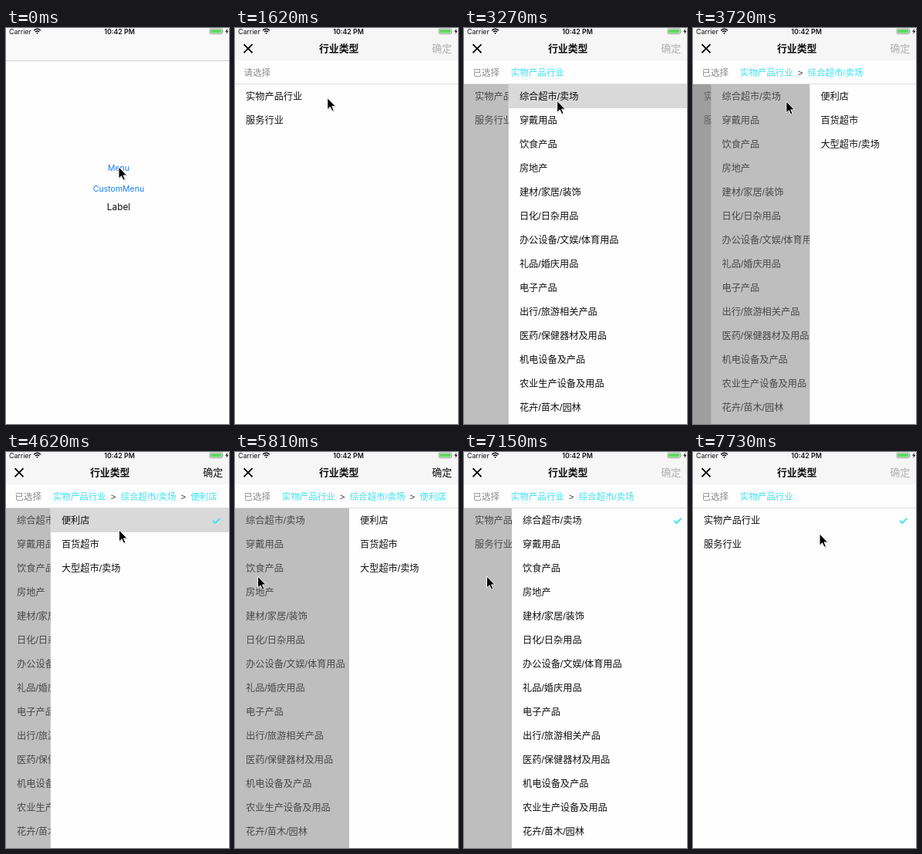
An HTML page for the animation above (8 s loop, 289 by 513 pixels).

```html
<!DOCTYPE html>
<html lang="zh-CN">
<head>
<meta charset="utf-8">
<style>
html, body { margin: 0; width: 100%; height: 100%; overflow: hidden; background: #fefefe; }
svg { display: block; width: 289px; height: 513px; }
text { font-family: "Liberation Sans", "Noto Sans CJK SC", sans-serif; font-size: 12.2px; fill: #111; }
.ui text { font-family: Inter, Roboto, sans-serif; }
.mid { text-anchor: middle; }
.check { fill: none; stroke: #46e3f2; stroke-width: 2; }
#crumbs text { font-size: 11.5px; }
</style>
</head>
<body>
<svg viewBox="0 0 289 513">
  <rect width="289" height="513" fill="#fefefe"/>
  <g class="ui mid">
    <rect width="289" height="42" fill="#f9f9f9"/>
    <rect y="42" width="289" height="1" fill="#cfcfcf"/>
    <text x="146" y="185.4" style="font-size:10.5px;fill:#157efb">Menu</text>
    <text x="146" y="212.3" style="font-size:10.5px;fill:#157efb">CustomMenu</text>
    <text x="146" y="235.8" style="font-size:11.8px">Label</text>
  </g>
  <g id="modal">
    <rect width="289" height="513" fill="#fefefe"/>
    <g id="panels"></g>
    <rect width="289" height="42" fill="#f6f6f6"/>
    <rect y="42" width="289" height="31" fill="#fefefe"/>
    <rect y="72" width="289" height="1" fill="#dedede"/>
    <path d="M11.5 21.2l11 11m0-11l-11 11" stroke="#000" stroke-width="1.9"/>
    <text class="mid" x="134.7" y="31.2" style="font-size:12.9px;font-weight:600">行业类型</text>
    <text id="ok" x="255.3" y="31.2" style="font-size:13px">确定</text>
    <g id="crumbs">
      <text id="hint" x="11.4" y="61.8" style="fill:#8c8c8c"></text>
      <text id="path" x="60.7" y="61.8"></text>
    </g>
  </g>
  <g class="ui">
    <text x="4" y="7.8" style="font-size:8.8px">Carrier</text>
    <text class="mid" x="147" y="7.8" style="font-size:8.8px;font-weight:600">10:42 PM</text>
    <g fill="none" stroke="#111" stroke-width="1.4">
      <path d="M36 3.2q4.5-4 9 0M37.8 5.1q2.7-2.4 5.4 0"/>
      <path d="M40.5 7.9l-1.3-1.4q1.3-1 2.6 0z" fill="#111" stroke="none"/>
    </g>
    <rect x="264" y=".9" width="16.6" height="6.8" rx="1.6" fill="none" stroke="#8f8f8f" stroke-width=".8"/>
    <rect x="265.1" y="2" width="14.4" height="4.6" rx=".7" fill="#5fd865"/>
    <path d="M281.6 3.2q1.2 1.1 0 2.2z" fill="#8f8f8f"/>
    <path d="M287 .8l-2.8 4h1.9l-.7 3.2 3-4.2h-2z" fill="#111"/>
  </g>
  <g id="cursor">
    <path d="M0 0V15L3.5 11.8 6 17.2 8.4 16.2 6 10.9H10.7Z" transform="translate(.6 1)" fill="#000" opacity=".25"/>
    <path d="M0 0V15L3.5 11.8 6 17.2 8.4 16.2 6 10.9H10.7Z" fill="#000" stroke="#fff" stroke-width="1"/>
  </g>
</svg>
<script>
const $ = id => document.getElementById(id);
const LOOP = 8000, W = 289, REST = 57.8, TOP = 73, ROW = 30.95;

const menus = [
  '实物产品行业 服务行业',
  '综合超市/卖场 穿戴用品 饮食产品 房地产 建材/家居/装饰 日化/日杂用品 办公设备/文娱/体育用品 礼品/婚庆用品 电子产品 出行/旅游相关产品 医药/保健器材及用品 机电设备及产品 农业生产设备及用品 花卉/苗木/园林',
  '便利店 百货超市 大型超市/卖场'
].map(s => s.split(' '));

// Each panel's shade also covers everything to its left, so shades stack up.
$('panels').innerHTML = menus.map((rows, i) => {
  const end = i ? W - REST : W;
  return `<g id="panel${i}">
    <rect y="${TOP}" width="${W}" height="440" fill="#fefefe"/>
    <rect id="glow${i}" y="${TOP}" width="${W}" height="${ROW}" fill="#d9d9d9"/>
    ${rows.map((s, n) => `<text x="14.1" y="${93.3 + n * ROW}">${s}</text>`).join('')}
    <path id="check${i}" class="check" d="M${end - 21} 89l3.2 3 6-6"/>
    <rect id="dim${i}" x="${-W}" y="${TOP}" width="${2 * W}" height="440" fill="#808080" opacity=".5"/>
  </g>`;
}).join('');

$('path').innerHTML = menus.map((rows, i) => `<tspan id="crumb${i}">` +
  (i ? '<tspan dx="6" fill="#333">&gt;</tspan>' : '') +
  `<tspan ${i ? 'dx="6"' : ''} style="fill:#3ee2f1">${rows[0]}</tspan></tspan>`).join('');

// The screen refreshes about every 150 ms, a few times after 140 ms.
const ticks = [0, 140];
for (let i = 2; i <= 52; i++)
  ticks.push(ticks[i - 1] + ([6, 8, 38, 48, 50, 52].includes(i) ? 140 : 150));

// Linear interpolation through [time, value, ...] keys.
function along(keys, t, k = 1) {
  const n = keys.findIndex(key => key[0] > t);
  if (n < 0) return keys[keys.length - 1][k];
  if (!n) return keys[0][k];
  const a = keys[n - 1], b = keys[n];
  return a[k] + (b[k] - a[k]) * (t - a[0]) / (b[0] - a[0]);
}

function slide(t, start) {
  const p = Math.min(1, Math.max(0, (t - start) / 500));
  return p * p * (3 - 2 * p);
}

const rise = [[0, 513], [140, 218], [290, 30], [440, 0]];
const pointer = [
  [740, 146, 180], [880, 152, 178], [1030, 158.5, 168], [1330, 142, 124], [1620, 119.8, 90.5],
  [2520, 119.8, 90.5], [3420, 120.8, 95], [3720, 120.8, 95], [4020, 128, 99], [4170, 146.5, 101],
  [4920, 146.5, 101], [5070, 128, 112], [5220, 62, 146], [5370, 29.5, 161],
  [7290, 29.5, 161], [7590, 140, 116], [7730, 164, 106]
];
const depths = [[2070, 1], [3420, 2], [4620, 3], [6100, 2], [7590, 1]];

const move = (id, x, y) => $(id).setAttribute('transform', `translate(${x} ${y})`);
const show = (id, on) => $(id).setAttribute('visibility', on ? 'visible' : 'hidden');

function draw(t) {
  const wide = W - REST;
  const x1 = W - wide * (slide(t, 2029) - slide(t, 7110)) - REST * (slide(t, 3438) - slide(t, 6100));
  const x2 = W - wide * (slide(t, 3438) - slide(t, 5597));
  const depth = depths.reduce((d, [at, n]) => t >= at ? n : d, 0);

  move('modal', 0, along(rise, t));
  move('panel1', x1, 0);
  move('panel2', x2, 0);
  move('cursor', along(pointer, t), along(pointer, t, 2));

  show('dim0', x1 < W);
  show('dim1', x2 < W);
  show('dim2', false);
  show('glow0', false);
  show('glow1', t >= 3270 && t < 3570);
  show('glow2', t >= 4470 && t < 4770);
  show('check0', t >= 7590);
  show('check1', t >= 6700);
  show('check2', t >= 4620);

  menus.forEach((m, i) => show('crumb' + i, i < depth));
  $('hint').textContent = depth ? '已选择' : '请选择';
  $('ok').style.fill = depth === 3 ? '#111' : '#b0b0b0';
}

function frame(now) {
  const t = now % LOOP;
  draw(ticks.filter(k => k <= t).pop());
  requestAnimationFrame(frame);
}
draw(0);
requestAnimationFrame(frame);
</script>
</body>
</html>
```
